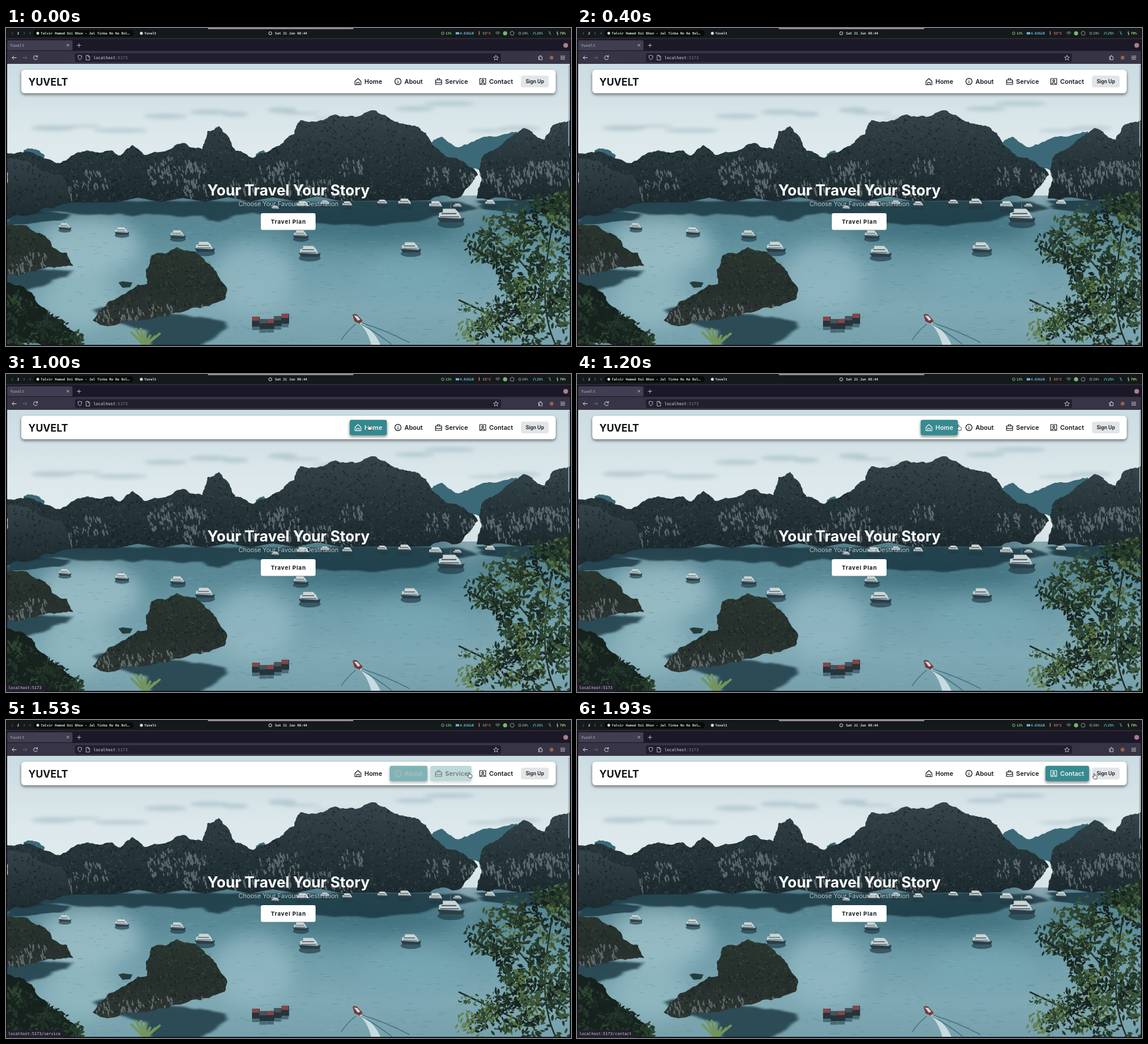
An HTML page that plays this animation: 960 by 541 pixels, repeating every 2000 ms.

```html
<!DOCTYPE html>
<html lang="en">
<head>
<meta charset="utf-8">
<title>Travel landing page</title>
<style>
html, body { margin: 0; width: 100%; height: 100%; overflow: hidden; background: #14131c; }
svg { display: block; width: 960px; height: 541px; }
text { white-space: pre; }
.sans { font-family: Inter, "Open Sans", sans-serif; }
.mono { font-family: "DejaVu Sans Mono", monospace; }
.line { fill: none; stroke-linecap: round; stroke-linejoin: round; }
</style>
</head>
<body>
<svg id="stage" viewBox="0 0 960 541" xmlns="http://www.w3.org/2000/svg"></svg>
<script>
let seed = 7;
const rnd = (a = 0, b = 1) => {
  seed = (seed * 1664525 + 1013904223) >>> 0;
  return a + (b - a) * seed / 4294967296;
};
const pick = list => list[Math.floor(rnd(0, list.length))];
const fix = v => v.toFixed(1);
const range = (n, fn) => Array.from({ length: n }, (_, i) => fn(i)).join('');
const path = (d, fill, extra = '') => `<path d="${d}" fill="${fill}" ${extra}/>`;
const rect = (x, y, w, h, fill, extra = '') =>
  `<rect x="${x}" y="${y}" width="${w}" height="${h}" fill="${fill}" ${extra}/>`;
const dot = (x, y, r, fill, extra = '') => `<circle cx="${x}" cy="${y}" r="${r}" fill="${fill}" ${extra}/>`;
const ring = (x, y, r, color) => dot(x, y, r, 'none', `stroke="${color}"`);
const oval = (x, y, rx, ry, fill, extra = '') =>
  `<ellipse cx="${fix(x)}" cy="${fix(y)}" rx="${fix(rx)}" ry="${fix(ry)}" fill="${fill}" ${extra}/>`;
const stroke = (d, color, width = 1, extra = '') =>
  `<path class="line" d="${d}" stroke="${color}" stroke-width="${width}" ${extra}/>`;
const text = (x, y, size, str, fill, cls = 'mono', extra = '') =>
  `<text class="${cls}" x="${x}" y="${y}" font-size="${size}" fill="${fill}" ${extra}>${str}</text>`;
const gradient = (id, ...colors) => `<linearGradient id="${id}" x1="0" y1="0" x2="0" y2="1">` +
  colors.map((c, i) => `<stop offset="${i / (colors.length - 1)}" stop-color="${c}"/>`).join('') + '</linearGradient>';
const blur = (id, size) => `<filter id="${id}" x="-50%" y="-50%" width="200%" height="200%"><feGaussianBlur stdDeviation="${size}"/></filter>`;

const defs = '<defs>' +
  gradient('sky', '#cbdce2', '#dce8eb', '#e3edef') +
  gradient('water', '#557f8b', '#5b8b98', '#719fab', '#7fa9b4', '#76a1ac') +
  gradient('stone', '#35454b', '#26353a', '#1c2a2f') +
  gradient('moss', '#2a3630', '#252f2c', '#2d3534') +
  blur('soft', 16) + blur('mist', 3) +
  '<filter id="lift" x="-10%" y="-30%" width="120%" height="180%"><feDropShadow dx="0" dy="2.5" stdDeviation="2.5" flood-color="#0a1418" flood-opacity=".55"/></filter>' +
  '<clipPath id="page"><rect x="2" y="61" width="956" height="478"/></clipPath></defs>';

// Closed outline whose edges are broken up by midpoint displacement.
function rough(pts, amp = 0.13) {
  for (let level = 0; level < 4; level++) {
    pts = pts.flatMap((p, i) => {
      const q = pts[(i + 1) % pts.length], dx = q[0] - p[0], dy = q[1] - p[1];
      const k = Math.hypot(dx, dy) > 90 ? 0 : rnd(-amp, amp);
      return [p, [(p[0] + q[0]) / 2 - dy * k, (p[1] + q[1]) / 2 + dx * k]];
    });
  }
  return 'M' + pts.map(p => p.map(fix).join(' ')).join('L') + 'Z';
}
const points = list => list.trim().split(/\s+/).map(p => p.split(',').map(Number));

function leaf(x, y, len) {
  const a = rnd(0, 6.28), c = Math.cos(a) * len, s = Math.sin(a) * len;
  return `M${fix(x)} ${fix(y)}q${fix(c / 2 - s * .4)} ${fix(s / 2 + c * .4)} ${fix(c)} ${fix(s)}` +
    `q${fix(-c / 2 + s * .4)} ${fix(-s / 2 - c * .4)} ${fix(-c)} ${fix(-s)}`;
}
const cluster = (x, y, r, n, len) => range(n, () => {
  const a = rnd(0, 6.28), d = Math.sqrt(rnd()) * r;
  return leaf(x + Math.cos(a) * d, y + Math.sin(a) * d * .7, rnd(.5, 1) * len);
});
const crack = (x, y, h) =>
  `M${fix(x)} ${fix(y)}l${fix(rnd(1, 3))} ${fix(-h * .3)} ${fix(rnd(0, 3))} ${fix(h)} ${fix(rnd(-3, 0))} ${fix(h * .3)}z`;

// A rock mass: mirrored shade in the water, mottled growth and pale cliff faces inside the outline.
function rock(list, fill, growth, shore, depth, cliffs) {
  const pts = points(list), d = rough(pts), id = 'rock' + Math.round(shore + pts[0][0]);
  const [x0, x1] = [Math.min, Math.max].map(f => f(...pts.map(p => p[0])));
  const [y0, y1] = [Math.min, Math.max].map(f => f(...pts.map(p => p[1])));
  const amount = (x1 - x0) * (y1 - y0) / 75;
  const speckle = range(Math.round(amount), () => leaf(rnd(x0, x1), rnd(y0, y1), rnd(2, 7)));
  const lit = range(Math.round(amount), () => leaf(rnd(x0, x1), rnd(y0, y1), rnd(2, 6)));
  const faces = range(cliffs, () => {
    const x = rnd(x0, x1), y = rnd(y0 * .45 + y1 * .55, y1 - 5);
    return range(26, () => crack(x + rnd(-22, 22), y + rnd(-14, 14), rnd(3, 10)));
  });
  return path(d, '#18323c', `opacity=".78" filter="url(#mist)" transform="translate(0 ${shore * (1 + depth)}) scale(1 ${-depth})"`) +
    path(d, fill) + `<clipPath id="${id}"><path d="${d}"/></clipPath><g clip-path="url(#${id})">` +
    path(speckle, '#131e22', 'opacity=".65"') + path(lit, growth, 'opacity=".6"') + path(faces, '#93a0a2', 'opacity=".5"') + '</g>';
}

const sky = () => rect(0, 61, 960, 240, 'url(#sky)') + '<g filter="url(#mist)">' +
  range(14, i => oval(90 + i * 61 + rnd(-20, 20), rnd(120, 175), rnd(20, 48), rnd(2, 5), '#a9c0c9', 'opacity=".7"')) + '</g>';

function water() {
  const pool = (x, y, rx, ry, color) => oval(x, y, rx, ry, color, 'opacity=".7"');
  const ripples = (color, opacity) => stroke(range(500, () => `M${fix(rnd(2, 950))} ${fix(rnd(300, 535))}h${fix(rnd(2, 12))}`),
    color, .7, `opacity="${opacity}"`);
  return rect(0, 285, 960, 256, 'url(#water)') + '<g filter="url(#soft)">' +
    pool(140, 370, 90, 50, '#a9c9d0') + pool(785, 285, 26, 20, '#c3d8dc') + pool(420, 425, 70, 60, '#98bdc6') +
    pool(620, 340, 150, 25, '#3a6975') + pool(125, 460, 60, 50, '#96bcc5') + pool(690, 430, 90, 40, '#79a9b5') + '</g>' +
    ripples('#a8c8cf', .28) + ripples('#28505c', .24);
}

const mountains = () =>
  path(rough(points('722,195 740,185 768,203 800,190 868,176 872,246 740,240')) +
    rough(points('30,208 45,205 66,217 66,230 30,230')) + rough(points('425,214 438,208 448,218 448,230 425,230')), '#3c6977') +
  rock(`0,212 45,212 92,230 130,210 180,208 195,217 215,199 235,216 305,196 334,206 342,176 362,167 378,185 390,209
    420,221 465,200 490,180 500,157 560,147 625,140 660,159 700,168 722,193 780,229 802,250 770,288 720,293 110,297 0,290`,
    'url(#stone)', '#40534f', 294, .28, 16) +
  rock('800,290 808,260 812,216 850,190 880,170 915,190 930,165 960,157 960,296', 'url(#stone)', '#41565a', 293, .2, 7) +
  rock('0,220 35,225 95,250 107,297 40,318 0,328', 'url(#stone)', '#33453f', 312, .25, 1);

const islands = () =>
  rock('0,335 60,350 104,383 114,405 50,414 0,420', 'url(#moss)', '#3b4d33', 410, .5, 2) +
  rock('147,497 185,462 240,435 247,387 290,373 320,380 365,430 376,445 372,462 260,490 160,505', 'url(#moss)', '#435335', 486, .55, 5);

function foliage() {
  const greens = ['#17231f', '#1d2d25', '#24372a', '#2d4530', '#3d5738', '#57713f'];
  const edge = y => 822 + 30 * Math.cos((y - 285) / 25);
  const tree = range(170, () => {
    const y = rnd(290, 541), left = edge(y) + Math.max(0, 330 - y) * 1.6;
    return path(cluster(rnd(left, 960), y, 17, 13, 12), pick(greens));
  });
  const low = range(14, () => path(cluster(rnd(775, 830), rnd(468, 541), 12, 9, 9), pick(['#4c6742', '#64804f', '#31492f'])));
  const corner = range(50, () => {
    const x = rnd(0, 120);
    return path(cluster(x, rnd(445 + x * .65, 541), 14, 12, 11), pick(greens.slice(0, 4)));
  });
  const sprout = range(7, i => `M236 541L${213 + i * 8} ${fix(518 - 7 * Math.sin(i))}`);
  return stroke('M935 541C900 470 920 390 935 290M915 450C880 400 845 360 805 345M890 520L770 463', '#202b22', 2.5) +
    tree + low + path(rough(points('0,432 30,440 75,490 130,541 0,541')), '#16211d') + corner + stroke(sprout, '#73945c', 4);
}

// Boats grow with their distance from the horizon.
function boat(x, y, w = (y - 275) * .34) {
  const h = w * .4, l = x - w / 2;
  return `<g transform="translate(${fix(l)} ${fix(y)}) scale(${fix(w)} ${fix(h)})">` +
    oval(.5, .5, .5, .4, '#1c3a45', 'opacity=".65"') +
    path('M0-.1L.85.05 1-.1.95.35H.1z', '#2d3d46') + path('M.06-.1V-.5L.2-.6V-.9H.65L.8-.5.88-.05z', '#cbd5d5') +
    path('M.1-.2H.8v.08H.1zM.15-.5H.7v.1H.15z', '#46585f') + path('M.48-.9V-1.4h.02v.5z', '#69797e') + '</g>';
}

function vessels() {
  const moored = range(9, i => boat(450 + i * 46 + rnd(-10, 10), 303 + rnd(-4, 7), rnd(14, 28)));
  const near = points('100,340 197,348 292,354 338,376 501,354 516,384 688,377').map(p => boat(...p)).join('');
  const huts = range(5, i => {
    const x = 418 + i * 12.5, y = 491 + 5 * Math.sin(i * 1.1);
    return rect(x, y, 13, 17, '#26343b') + rect(x, y, 12, 7, i % 2 ? '#48545a' : '#844649') + rect(x, y + 17, 12, 6, '#274852', 'opacity=".6"');
  });
  return moored + near + boat(756, 324, 46) + huts + path('M191 433L198 431 215 433 211 441 198 442Z', '#253c3d') +
    path('M600 502Q615 515 621 541L637 541Q629 519 604 501Z', '#d5e6e9', 'opacity=".85"') +
    stroke('M605 502Q645 514 685 535M604 504Q632 520 655 538M594 504Q580 515 570 530', '#2e5e6b', 1.5, 'opacity=".7"') +
    path('M589 488Q592 485 597 488L606 498 601 503 592 499Z', '#713b3e') + path('M591 489l6 1 5 6-4 2z', '#d7d8d6');
}

function topBar() {
  const t = (x, s, c = '#d5ddd8') => text(x, 11, 5.7, s, c, 'mono', 'font-weight="700"');
  return rect(0, 0, 960, 541, '#15141d') + rect(343, 0, 247, 2, '#9b8d97') +
    rect(0, 17, 960, 2, '#302732') + rect(2, 2, 956, 15, '#141a1c', 'rx="3"') +
    range(4, i => t(9 + i * 10, i + 1, i === 1 ? '#eef1ee' : '#4d565a')) +
    rect(47, 3.5, 170, 11, '#070b0c', 'rx="5"') + dot(54, 9, 2.4, '#cde2c8') +
    t(59, 'Talvir Hamed Ozi Bhun - Jal Tinka Ro Ke Bol…', '#cde2c8') +
    dot(230, 9, 2.5, '#e2e5e5') + t(235, 'Yuvelt') +
    ring(449, 9, 2.6, '#d5ddd8') + t(457, 'Sat 21 Jun 08:44') +
    ring(742, 9, 2.2, '#7fbd7a') + t(747, '13%', '#8fce85') + rect(764, 7, 6, 4, '#65aec7') + t(771, '4.63GiB', '#72bdd6') +
    stroke('M804 6v5', '#d96b6b', 1.5) + t(810, '53°C', '#e27b78') +
    stroke('M832 8q3.5-3 7 0M833.5 9.5q2-1.5 4 0M835.5 11h.1', '#b7c6c7', .8) +
    dot(848, 9, 3.5, '#79b968') + ring(860, 9, 3.3, '#9b9298') + ring(873, 9, 2, '#8b9699') + t(877, '20%', '#919c9f') +
    stroke('M896 11V9q2-4 4 0v2', '#65b4c4') + t(902, '25%', '#6fc0ce') +
    stroke('M922 6l4 5M924 6v5', '#5b9ba7', .9) + stroke('M937 6l-1 3h2l-1 3', '#c8d58b') + t(941, '79%', '#c2d88e');
}

function browserBars() {
  const ink = '#dcdae3';
  return rect(2, 19, 956, 20, '#1b1928') + rect(2, 39, 956, 22, '#373545') + rect(2, 21, 111, 17, '#403e50', 'rx="2"') +
    text(7, 31.5, 6.7, 'Yuvelt', '#a9bfc3') + stroke('M103.5 27.5l3.5 3.5m0-3.5l-3.5 3.5M124 26.5v6m-3-3h6', ink, .8) + dot(951, 29.5, 4, '#a97f89') +
    stroke('M17.5 50.5h-7m2.8-2.8l-2.8 2.8 2.8 2.8M53 48.5a3.4 3.4 0 1 0 .3 3.5M53.4 46.8v2.3h-2.3', ink) +
    stroke('M28.5 50.5h7m-2.8-2.8l2.8 2.8-2.8 2.8', '#557069') + rect(117, 43, 724, 15, '#211f2e', 'rx="3"') +
    stroke('M125.5 46.5l3.3 1q0 5-3.3 7-3.3-2-3.3-7zM136.5 46.5h3.5l2 2v6h-5.5zM139.5 46.5v2.5h2.5', ink, .8) +
    text(148.5, 53, 6.9, 'localhost<tspan fill="#85838e">:5173</tspan>', '#e2e0e8') +
    stroke('M832.5 46.5l1.2 2.8 3 .2-2.3 2 .8 3-2.7-1.6-2.7 1.6.8-3-2.3-2 3-.2z', ink, .8) +
    stroke('M905 49h2v-2h2v2h2v5h-6v-1.5h1.5v-1.5H905zM942.5 48h7m-7 2.5h7m-7 2.5h7', ink, .9) + dot(927, 50.5, 3.2, '#9c604b');
}

const links = [
  { label: 'Home', x: 584, w: 63, url: '', icon: 'M1 5.5L6 1l5 4.5V11.5H1zM4 11.5V7.5h4v4' },
  { label: 'About', x: 652, w: 64, url: '/about', icon: 'M6 .7a5.3 5.3 0 1 0 .01 0M6 5.7v3M6 3.5v.2' },
  { label: 'Service', x: 721, w: 70, url: '/service', icon: 'M.8 3.5h10.4v7.5H.8zM4 3.5V1h4v2.5M.8 6.5q5.2 3 10.4 0' },
  { label: 'Contact', x: 796, w: 74, url: '/contact', icon: 'M1 1h10v10H1zM6 3.2a1.6 1.6 0 1 0 .01 0M3 11q0-3 3-3t3 3' }
];

function page() {
  const nav = links.map((l, i) => `<g id="link${i}"><rect x="${l.x}" y="78" width="${l.w}" height="26" rx="3" fill="#31898f" filter="url(#lift)"/>` +
    stroke(l.icon, 'currentColor', 1.2, `transform="translate(${l.x + 8} 85)"`) +
    text(l.x + 25, 95, 10.6, l.label, 'currentColor', 'sans', 'font-weight="600"') + '</g>').join('');
  const centred = (x, y, size, str, fill, weight, extra = '') =>
    text(x, y, size, str, fill, 'sans', `font-weight="${weight}" text-anchor="middle" ${extra}`);
  return `<g clip-path="url(#page)">` + sky() + water() + mountains() + islands() + vessels() + foliage() +
    rect(26, 71, 908, 40, '#fff', 'rx="6" filter="url(#lift)"') +
    text(38, 97.5, 17, 'YUVELT', '#101416', 'sans', 'font-weight="700"') + nav +
    rect(875, 81, 47, 20, '#e1e5e7', 'rx="4"') + centred(898.5, 94.2, 8.3, 'Sign Up', '#14191c', 600) +
    centred(480, 285, 25.3, 'Your Travel Your Story', '#fff', 700) +
    centred(480, 302.5, 10.6, 'Choose Your Favourite Destination', '#e5ebec', 300) +
    rect(433, 315, 93, 28.5, '#fff', 'rx="3"') + centred(480, 332.8, 9.6, 'Travel Plan', '#14191c', 700, 'letter-spacing=".75"') +
    rect(955.5, 63, 1.5, 138, '#a3adb2', 'rx=".7"') + '</g>' +
    `<g id="status"><rect id="statusBox" x="0" y="528" height="13" rx="2" fill="#211f2d"/>${text(4, 536, 6.7, '', '#d3d1db', 'mono', 'id="statusText"')}</g>` +
    `<g id="cursor" stroke="#22282b" stroke-width=".8" stroke-linejoin="round" fill="#fff"><path id="arrow" d="M0-4v8l2-1.8 1.5 3 1.5-.8-1.5-2.8h2.5z"/>` +
    `<path id="hand" d="M-1.5-4.5q1.2-1 1.7.3v2.5l3.3 1q1 .5.7 2l-.7 3.2h-4.3l-2.9-4 1-.8 1.2 1z"/></g>`;
}

document.getElementById('stage').innerHTML = defs + topBar() + browserBars() + page();

const el = id => document.getElementById(id);
const mix = (a, b, k) => a + (b - a) * k;
const ease = x => { x = Math.min(1, Math.max(0, x)); return x * x * (3 - 2 * x); };

// Pointer key points: time, x, y.
const route = points('440,613,290 670,605,103 800,611,93 1000,617,91 1180,647,91 1230,652,92 1330,685,93 1430,716,93 1530,787,94 1910,869,96 2000,910,96');
function pointer(t) {
  const i = Math.max(1, route.findIndex(p => p[0] >= t));
  const [a, b] = [route[i - 1], route[i]], k = (t - a[0]) / (b[0] - a[0]);
  return [mix(a[1], b[1], k), mix(a[2], b[2], k)];
}

// Each link lights up while the pointer is over its box.
const parts = links.map((l, i) => {
  const over = [];
  for (let t = route[0][0]; t < 2000; t += 5) {
    const [x, y] = pointer(t);
    if (x >= l.x && x <= l.x + l.w && y < 104) over.push(t);
  }
  const group = el('link' + i);
  return { ...l, group, box: group.firstChild, on: over[0], off: over[over.length - 1] };
});

function draw(time) {
  const t = Math.min(29, Math.floor((time % 2000 + 3.4) * .015)) / .015;
  for (const p of parts) {
    const k = ease((t - p.on) / 250) * (1 - ease((t - p.off) / 250));
    p.box.setAttribute('opacity', k);
    p.group.style.color = `rgb(${[20, 25, 28].map(c => Math.round(mix(c, 245, k ** .7))).join()})`;
  }
  const current = parts.filter(p => t >= p.on).pop();
  const shown = t >= route[0][0];
  el('status').style.display = current ? '' : 'none';
  if (current) {
    const url = 'localhost:5173' + current.url;
    el('statusText').textContent = url;
    el('statusBox').setAttribute('width', 8 + url.length * 4.03);
  }
  el('cursor').style.display = shown ? '' : 'none';
  if (shown) el('cursor').setAttribute('transform', `translate(${pointer(t).map(fix).join(' ')})`);
  el('arrow').style.display = current ? 'none' : '';
  el('hand').style.display = current ? '' : 'none';
}

const start = performance.now();
(function tick() {
  draw(performance.now() - start);
  requestAnimationFrame(tick);
})();
</script>
</body>
</html>
```
